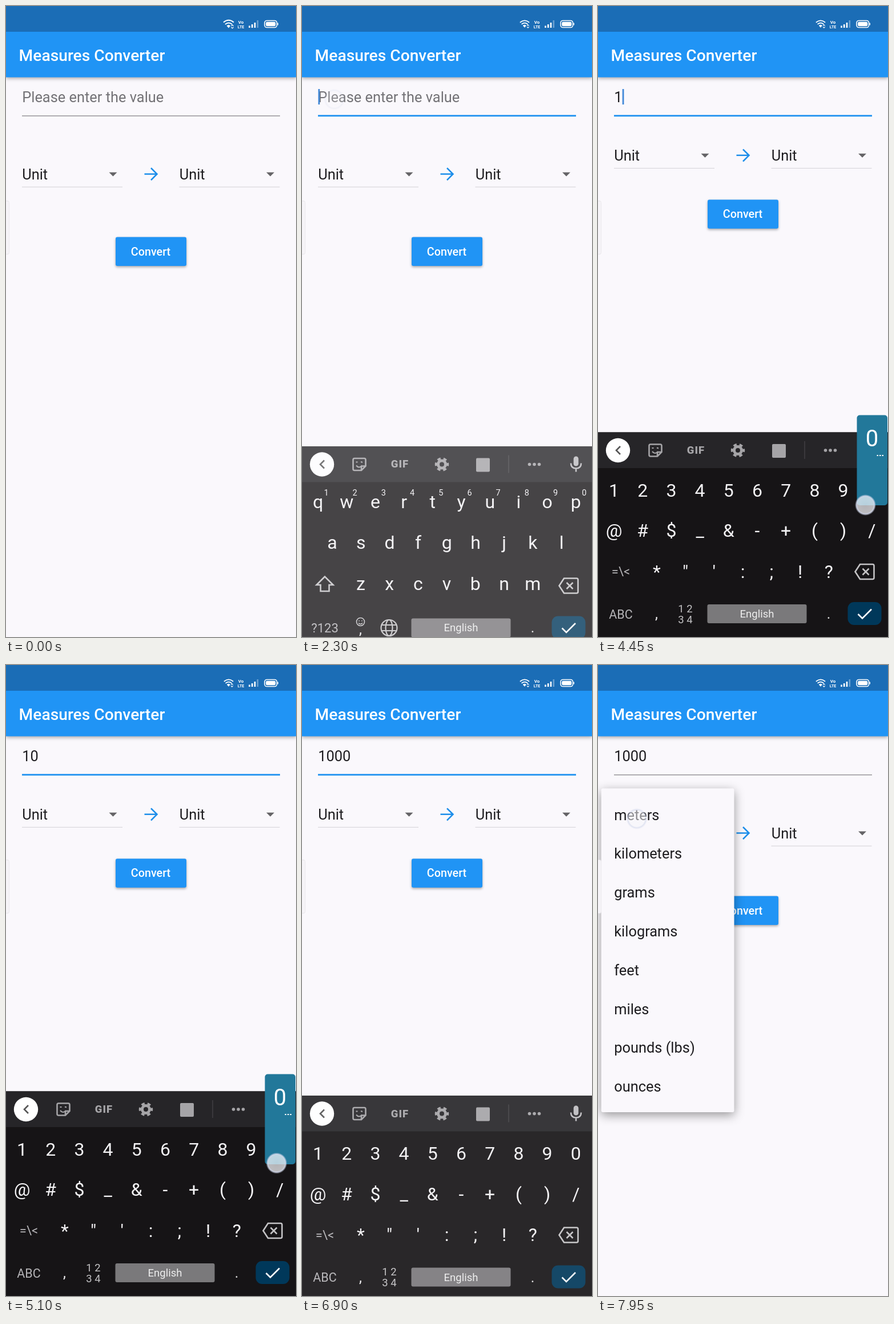
Recreate the animation shown at these times as an HTML page. Size 508x1102 px, loop 8 s.

```html
<!DOCTYPE html>
<html lang="en">
<head>
<meta charset="utf-8">
<title>Unit converter</title>
<style>
html, body { margin: 0; width: 100%; height: 100%; overflow: hidden; background: #faf8fc; }
svg { display: block; width: 100%; height: 100%; font-family: Roboto, sans-serif; }
.body { font-size: 25.4px; fill: #1d1c1f; }
.mid { text-anchor: middle; }
.medium { font-weight: 500; fill: #fff; }
.line { fill: none; stroke-width: 2.6; }
.bar { filter: drop-shadow(0 2px 3px #0005); }
.raised { filter: drop-shadow(0 2px 2px #0005); }
.menu { filter: drop-shadow(0 5px 9px #0006); }
</style>
</head>
<body>
<svg viewBox="0 0 508 1102">
  <defs>
    <radialGradient id="glow">
      <stop offset="0" stop-color="#f6f6fa" stop-opacity=".7"/>
      <stop offset=".74" stop-color="#f6f6fa" stop-opacity=".74"/>
      <stop offset=".84" stop-color="#d3d9ec" stop-opacity=".95"/>
      <stop offset="1" stop-color="#d3d9ec" stop-opacity="0"/>
    </radialGradient>
  </defs>
  <rect width="508" height="1102" fill="#faf8fc"/>

  <g class="bar">
    <rect width="508" height="124.5" fill="#2094f5"/>
  </g>
  <rect width="508" height="45" fill="#1b6db6"/>
  <text class="medium" x="22.6" y="95.5" font-size="28.2">Measures Converter</text>

  <g fill="none" stroke="#fff" stroke-width="2">
    <g id="wifi">
      <path d="M381 28.5Q390 21 399 28.5M384 32Q390 27 396 32"/>
      <path d="M386.5 34.5Q390 31.5 393 34.5L390 38.5Z" fill="#fff" stroke="none"/>
      <path d="M394.5 35l2-2 2 2M394.5 37l2 2 2-2" stroke-width="1.2"/>
    </g>
    <path d="M426.5 38v-3.5M431.2 38v-6M436 38v-9" stroke-width="2.6"/>
    <path d="M440.8 38v-13" stroke-width="2.6" opacity=".35"/>
    <rect x="453" y="25.5" width="21.5" height="12" rx="4" stroke-width="1.6"/>
    <rect x="455.2" y="27.7" width="17" height="7.6" rx="2" fill="#fff" stroke="none"/>
    <path d="M476.3 29.5v4" stroke-width="1.4"/>
  </g>
  <g class="mid" fill="#fff" font-size="8" font-weight="700">
    <text x="411.5" y="31">Vo</text><text x="411.5" y="38.5" font-size="7">LTE</text>
  </g>

  <text id="value" class="body" x="28.2" y="168"></text>
  <rect id="cursor" y="145" width="2.8" height="27" fill="#4289d8"/>
  <rect id="underline" x="28" width="452"/>

  <g id="units"></g>
  <g id="convert">
    <rect class="raised" x="192" y="403.5" width="124" height="50.5" rx="3" fill="#2094f5"/>
    <text class="medium mid" x="253.5" y="435.5" font-size="19.75">Convert</text>
  </g>

  <g id="menu">
    <rect id="sheet" class="menu" x="5.7" width="232.8" rx="3" fill="#faf8fc"/>
    <g id="items" class="body"></g>
  </g>

  <path d="M0 340.5h3q2.5 0 2.5 3v87q0 3-2.5 3h-3" fill="#f6f4f8" stroke="#eae8ec"/>

  <g id="keyboard">
    <rect y="744.5" width="508" height="470" fill="#161416"/>
    <rect y="744.5" width="508" height="62.5" fill="#262528"/>
    <circle cx="35" cy="776" r="21.2" fill="#fff"/>
    <path class="line" d="M39 769l-7 7 7 7" stroke="#555"/>
    <g stroke="#a5a4a7" class="line">
      <path d="M92 765.5h17q2.5 0 2.5 2.5v11l-7.5 7.5h-12q-2.500 0-2.500-2.500v-16q0-2.500 2.500-2.500zM111 779h-5q-2 0-2 2v5"/>
      <path d="M95 778q5 6 10 0M94.500 772h3M103 771.500l3 1" stroke-width="2.200"/>
      <circle cx="245" cy="776" r="6.500" stroke-width="5"/>
      <circle cx="245" cy="776" r="10" stroke-width="4.500" stroke-dasharray="5.600 4.872" stroke-dashoffset="2.800"/>
      <path d="M362 760v31" stroke="#48474a" stroke-width="1.200"/>
    </g>
    <rect x="305" y="765" width="24" height="24" rx="2" fill="#a5a4a7"/>
    <text class="mid" x="171.500" y="782" font-size="18.500" font-weight="900" fill="#a5a4a7" letter-spacing="1">GIF</text>
    <g fill="#a5a4a7">
      <circle cx="398.500" cy="776" r="2.800"/><circle cx="407" cy="776" r="2.800"/><circle cx="415.500" cy="776" r="2.800"/>
      <rect x="475.700" y="762" width="8.600" height="17" rx="4.300" fill="#bdbcbf"/>
      <path class="line" d="M471 774q0 9 9 9t9-9M480 783v6" stroke="#bdbcbf" style="fill:none"/>
    </g>

    <g id="letters">
      <path class="line" d="M40 972l-14.500 14.500h7v11h15v-11h7z" stroke="#c4c3c5"/>
      <g class="line" stroke="#c4c3c5" stroke-width="2">
        <circle cx="102.500" cy="1051" r="7" style="stroke-width:1.600"/>
        <path d="M99 1053q3.500 4 7 0M100 1048.500v1.500M105 1048.500v1.500" style="stroke-width:1.600"/>
        <g style="stroke-width:2.200"><circle cx="152.500" cy="1061.500" r="14"/><ellipse cx="152.500" cy="1061.500" rx="6" ry="14"/><path d="M139.500 1056.500h26M139.500 1066.500h26"/></g>
      </g>
    </g>
    <g id="symbols"></g>

    <path class="line" d="M459 975h22q2.500 0 2.500 2.500v21q0 2.500-2.500 2.500h-22l-8.500-13zM463.500 982.500l11 11M474.500 982.500l-11 11" stroke="#c4c3c5"/>
    <rect x="191.500" y="1045" width="174" height="33" rx="3" fill="#7a797b"/>
    <text class="mid" x="278.500" y="1068" font-size="18.500" fill="#eee">English</text>
    <text class="mid" x="404" y="1070" font-size="25" fill="#ddd">.</text>
    <rect x="437.500" y="1041" width="59" height="40" rx="11" fill="#00385a"/>
    <path class="line" d="M455.500 1062l7.500 7.500 16-16" stroke="#fff"/>
  </g>

  <g id="popup">
    <rect x="-26.500" y="714.500" width="53.500" height="157.500" rx="5" fill="#22789a"/>
    <text id="popupKey" class="mid" y="769" font-size="40" fill="#fff"></text>
    <path d="M8.500 785h2.500m2 0h2.500m2 0h2.500" stroke="#fff" stroke-width="2.200"/>
  </g>
  <circle id="touch" r="18.500" fill="url(#glow)"/>
</svg>

<script>
const $ = id => document.getElementById(id);
const set = (id, attrs) => { for (const k in attrs) $(id).setAttribute(k, attrs[k]); };
const show = (id, on) => set(id, { visibility: on ? 'visible' : 'hidden' });
const clamp = v => Math.max(0, Math.min(1, v));
const span = (t, from, to) => clamp((t - from) / (to - from));
const mix = (a, b, p) => a + (b - a) * p;

const LOOP = 8000, STEP = 50.2;
const UNITS = ['meters', 'kilometers', 'grams', 'kilograms', 'feet', 'miles', 'pounds (lbs)', 'ounces'];

const FOCUS = 2180, BLUR = 6850;
const KEYS_IN = 2200, SHIFT_IN = 2400, SHIFT_OUT = 7050;
const SYMBOLS = 3560, MENU = 7000;

// down, up, x, y, key
const TAPS = [
  [1950, 2180, 56.5, 163],
  [3420, 3560, 32, 1064],
  [4060, 4200, 24, 870, '1'],
  [4390, 4550, 468.5, 871.5, '0'],
  [4990, 5150, 474, 870, '0'],
  [5490, 5660, 477, 869.5, '0'],
  [6910, 7000, 66, 266],
  [7740, 7910, 68, 268.5]
];
const typed = TAPS.filter(tap => tap[4]);
const blinkStarts = [KEYS_IN, 2700, ...typed.map(tap => tap[1])];

const escape = c => c.replace('&', '&amp;').replace('<', '&lt;');
const label = (s, x, y, size, fill = '#f4f3f5') =>
  `<text class="mid" x="${x}" y="${y}" font-size="${size}" fill="${fill}">${escape(s)}</text>`;
const row = (chars, x, y, size) =>
  [...chars].map((c, i) => label(c, x + i * STEP, y, size)).join('');

function build() {
  const unit = x => `<text class="body" x="${x + 0.2}" y="303">Unit</text>
    <path d="M${x + 152.5} 290.500h14l-7 7z" fill="#656467"/>
    <rect x="${x}" y="315.500" width="176" height="1.200" fill="#d9d7dc"/>`;
  $('units').innerHTML = unit(28) + unit(303.5) +
    '<path class="line" d="M242.500 293.500h21M254 283l10.500 10.500L254 304" stroke="#1d8eea"/>';

  $('items').innerHTML = UNITS.map((name, i) =>
    `<text x="28.2" y="${270.5 + i * 67.8}">${escape(name)}</text>`).join('');

  $('letters').innerHTML += row('qwertyuiop', 28, 853, 32) + row('1234567890', 42.5, 831, 14.5) +
    row('asdfghjkl', 53, 924, 32) + row('zxcvbnm', 103, 995.5, 32) +
    label('?123', 40, 1069.5, 22, '#b5b4b7') + label(',', 102.5, 1073, 25);

  $('symbols').innerHTML = row('1234567890', 28, 856.5, 32) + row('@#$_&-+()/', 28, 927, 32) +
    row('*"\':;!?', 103, 998.5, 32) + label('=\\<', 40, 995, 22, '#b5b4b7') +
    label('ABC', 40, 1069.5, 21.5, '#b5b4b7') + label(',', 102.5, 1070, 25) +
    label('1 2', 153, 1058.5, 18.5, '#c4c3c5') + label('3 4', 153, 1077.5, 18.5, '#c4c3c5');
}

function drawField(t) {
  const text = typed.filter(tap => t >= tap[1]).map(tap => tap[4]).join('');
  $('value').textContent = text || 'Please enter the value';
  $('value').style.fill = text ? '#1d1c1f' : '#737276';

  const focused = t >= FOCUS && t < BLUR + 60;
  const blue = span(t, FOCUS, FOCUS + 100) * (1 - span(t, BLUR + 60, BLUR + 200));
  const tone = [mix(145, 32, blue), mix(144, 146, blue), mix(147, 240, blue)].map(Math.round);
  set('underline', {
    y: focused ? 190.3 : 191.2,
    height: focused ? 2.8 : 1.4,
    fill: `rgb(${tone})`
  });

  const start = blinkStarts.filter(s => s <= t).pop();
  const lit = start !== undefined && Math.floor((t - start) / 500) % 2 === 0;
  show('cursor', lit && t < BLUR);
  set('cursor', { x: 28.4 + 14.26 * text.length });
}

function drawLayout(t) {
  const up = t >= SHIFT_IN && t < SHIFT_OUT;
  set('units', { transform: `translate(0 ${up ? -32.7 : 0})` });
  set('convert', { transform: `translate(0 ${up ? -65.2 : 0})` });
}

function drawKeyboard(t) {
  const enter = 1 - (1 - span(t, KEYS_IN, KEYS_IN + 200)) ** 2.2;
  const leave = span(t, BLUR, BLUR + 200) ** 1.8;
  const alpha = enter * (1 - leave);
  const drop = (1 - enter) * 115 + leave * 88;
  show('keyboard', alpha > 0);
  set('keyboard', { opacity: alpha, transform: `translate(0 ${drop})` });
  $('letters').style.display = t < SYMBOLS ? '' : 'none';
  $('symbols').style.display = t < SYMBOLS ? 'none' : '';
}

function drawMenu(t) {
  const p = span(t, MENU, MENU + 300);
  const grow = 1 - (1 - span(p, 0.25, 0.5)) ** 2;
  const top = mix(228, 215.5, grow), bottom = mix(296, 781, grow);
  show('menu', p > 0);
  set('menu', { opacity: span(p, 0, 0.25) });
  set('sheet', { y: top, height: bottom - top });
  const slot = 0.5 / (UNITS.length + 1.5);
  [...$('items').children].forEach((item, i) => {
    const from = 0.5 + i * slot;
    item.setAttribute('opacity', span(p, from, from + 1.5 * slot));
  });
}

function drawTouch(t) {
  const tap = TAPS.filter(item => item[0] <= t).pop();
  if (!tap) {
    show('touch', false);
    show('popup', false);
    return;
  }
  const [down, up, x, y, key] = tap;
  const alpha = span(t, down - 20, down + 30) * (1 - span(t, up, up + 200)) ** 1.4;
  show('touch', alpha > 0);
  set('touch', { cx: x, cy: y, opacity: alpha });

  show('popup', key && t < up);
  if (key) {
    $('popupKey').textContent = key;
    set('popup', { transform: `translate(${key === '0' ? 480 : 29} 0)` });
  }
}

function draw(t) {
  set('wifi', { transform: t < 50 ? '' : 'translate(39 3.1) scale(.9)' });
  drawField(t);
  drawLayout(t);
  drawKeyboard(t);
  drawMenu(t);
  drawTouch(t);
}

build();
const begin = performance.now();
function tick() {
  draw((performance.now() - begin) % LOOP);
  requestAnimationFrame(tick);
}
tick();
</script>
</body>
</html>
```
